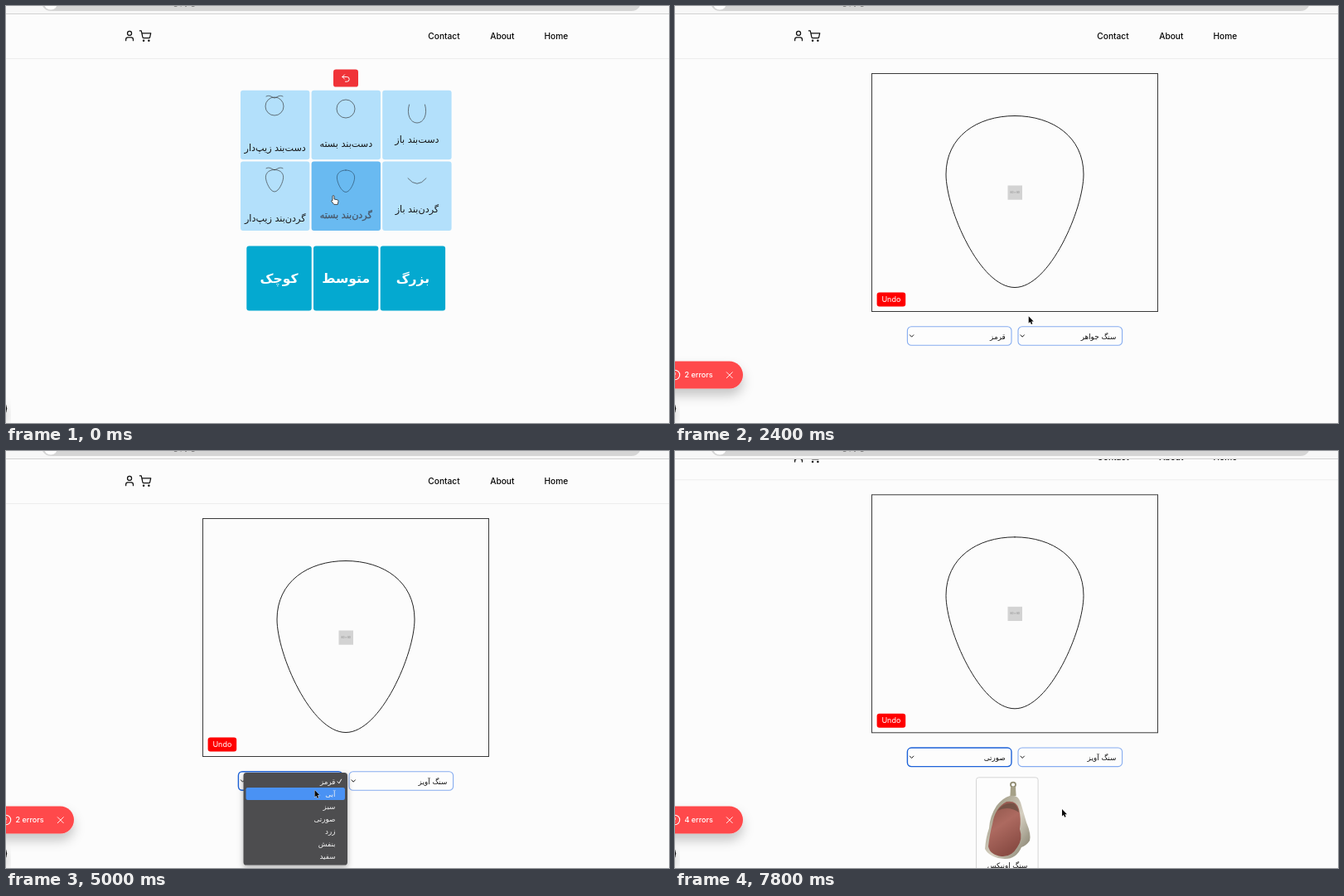
An HTML page for the animation above (8000 ms loop, 800 px wide and 503 px high).

```html
<!DOCTYPE html>
<html lang="en">
<head>
<meta charset="utf-8">
<title>Jewellery builder</title>
<style>
  html, body { margin: 0; width: 100%; height: 100%; overflow: hidden; background: #fcfcfc; }
  svg { display: block; width: 100vw; height: 100vh; }
  text { font-family: Inter, Roboto, sans-serif; }
  .fa { font-family: "DejaVu Sans", "Noto Sans", sans-serif; }
  .line { fill: none; stroke-linecap: round; stroke-linejoin: round; }
</style>
</head>
<body>
<svg id="stage" viewBox="0 0 800 503" xmlns="http://www.w3.org/2000/svg"></svg>
<script>
const LOOP = 8000, STEP = 200, SCROLL = 28.7, ROW = 15;
const PEAR = "M410 132.5C456 132.5 493 158 493 203C493 245 452 339.5 410 339.5" +
             "C368 339.5 327 245 327 203C327 158 364 132.5 410 132.5Z";
const KINDS = ["سنگ جواهر", "سنگ آویز"];
const COLOURS = ["قرمز", "آبی", "سبز", "صورتی", "زرد", "بنفش", "سفید"];

// time, x, y of the pointer tip
const PATH = [
  [0, 395, 229], [800, 398, 236], [1200, 420, 298], [1400, 423, 312], [2000, 423, 312],
  [2600, 428, 396], [2800, 428, 398], [3200, 446, 400], [3400, 452, 411], [3800, 452, 411],
  [4200, 378, 400], [4400, 373, 399], [4800, 373, 399], [5400, 371, 438], [6000, 371, 438],
  [6800, 447, 453], [7200, 470, 440], [7800, 467, 432]
];

const rect = (x, y, w, h, r, attrs) =>
  `<rect x="${x}" y="${y}" width="${w}" height="${h}" rx="${r}" ${attrs}/>`;
const text = (x, y, size, str, attrs = "") =>
  `<text x="${x}" y="${y}" font-size="${size}" ${attrs}>${str}</text>`;
const fa = (x, y, size, str, attrs = "") =>
  text(x, y, size, str, `class="fa" ${attrs}`);
const line = (d, color, width, attrs = "") =>
  `<path class="line" d="${d}" stroke="${color}" stroke-width="${width}" ${attrs}/>`;

function smallPear(cx, top) {
  return `<g transform="translate(${cx} ${top}) scale(.128) translate(-410 -132.5)">` +
    line(PEAR, "#333", 5) + `</g>`;
}
const bow = (cx, y) => line(`M${cx - 10} ${y}c4 -2 6 .6 10 2c4 -1.4 6 -4 10 -2`, "#333", .65);

function tile(col, row, label, base, art, id = "") {
  const x = 283 + col * 85.6, y = 101.8 + row * 85.7;
  return `<g id="${id}">` + rect(x, y, 83.4, 83.4, 3, 'fill="#b3e0fb"') + art +
    fa(x + 41.7, base, 11.2, label, 'text-anchor="middle" fill="#161616"') + `</g>`;
}

function sizeTile(x, label, id) {
  return rect(x, 289.5, 78.4, 78, 3, `id="${id}" fill="#04a9d0"`) +
    fa(x + 39.2, 334, 15.6, label, 'text-anchor="middle" font-weight="700" fill="#fff"');
}

function select(x, id) {
  return `<g id="${id}">` + rect(x, 386.7, 125.6, 22.6, 4.8, 'fill="#fdfdfd"') +
    line(`M${x + 3} 396.8l2.2 2.4l2.2 -2.4`, "#222", 1) +
    fa(x + 118.3, 401.5, 8.8, "", 'text-anchor="end" fill="#111"') + `</g>`;
}

function popup(x, items, id) {
  const rows = items.map((s, i) =>
    fa(x + 111, 402 + i * ROW, 8.8, s, 'text-anchor="end" fill="#f2f2f2"')).join("");
  return `<g id="${id}">` +
    rect(x, 388, 125.5, items.length * ROW + 6.5, 3.6, 'fill="#4d4d4f" filter="url(#soft)"') +
    rect(x + 3, 391, 119.5, ROW, 2.2, 'class="mark" fill="#4a92f4"') + rows +
    line(`M${x + 113.5} 398.8l1.8 2.1l2.8 -4.8`, "#fff", 1) + `</g>`;
}

const nav = `
  <path d="M0 63.5H800" stroke="#ededed"/>
  <g transform="translate(141.5 28.5) scale(.63)">
    ${line("M19 21v-2a4 4 0 0 0-4-4H9a4 4 0 0 0-4 4v2M16 7a4 4 0 1 1-8 0a4 4 0 0 1 8 0", "#111", 2)}</g>
  <g transform="translate(160.4 28.5) scale(.63)">
    ${line("M1.5 2h3l2.7 12.4a2 2 0 0 0 2 1.6h9.8a2 2 0 0 0 2-1.6L22.7 7H5.6" +
           "M10 21a1 1 0 1 1-2 0a1 1 0 0 1 2 0M20 21a1 1 0 1 1-2 0a1 1 0 0 1 2 0", "#111", 2)}</g>
  ${[[509.3, "Contact"], [584.2, "About"], [649.5, "Home"]]
    .map(([x, s]) => text(x, 40, 10.2, s, 'font-weight="500" fill="#050505"')).join("")}`;

const chooser = `<g id="chooser">
  ${rect(395, 76.6, 30, 21, 3.2, 'fill="#f03338"')}
  <g transform="translate(403.8 80.8) scale(.52)">
    ${line("M9 14L4 9l5-5M4 9h10.5a5.5 5.5 0 0 1 0 11H11", "#fff", 1.9)}</g>
  ${tile(0, 0, "دست\u200cبند زیپ\u200cدار", 174.5,
    '<circle cx="324" cy="121" r="11" fill="none" stroke="#333" stroke-width=".65"/>' + bow(324, 109))}
  ${tile(1, 0, "دست\u200cبند بسته", 170,
    '<circle cx="410" cy="124" r="11" fill="none" stroke="#333" stroke-width=".65"/>')}
  ${tile(2, 0, "دست\u200cبند باز", 164.5,
    line("M486.5 119C483 131 488 141 496 141C504 141 509 131 505.5 119", "#333", .65))}
  ${tile(0, 1, "گردن\u200cبند زیپ\u200cدار", 259.5, smallPear(324, 197.5) + bow(324, 195.8))}
  ${tile(1, 1, "گردن\u200cبند بسته", 256, smallPear(410, 198), "closed")}
  ${tile(2, 1, "گردن\u200cبند باز", 249, line("M485 207.8Q496 221 507 207.8", "#333", .65))}
  ${sizeTile(290.3, "کوچک", "small")}
  ${sizeTile(371, "متوسط", "medium")}
  ${sizeTile(451.7, "بزرگ", "large")}
</g>`;

const pendant = `<g id="pendant" transform="translate(0 ${SCROLL})">
  <ellipse cx="408" cy="402.5" rx="3" ry="2.8" fill="none" stroke="#8f8b72" stroke-width="1.8"/>
  <path d="M405 405H411L411.6 416H404.4Z" fill="#a5a087"/>
  <path fill="url(#silver)" d="M404 416Q414 414 417 424Q420 434 424 448Q430 462 428 470Q424 476 418 478
    Q412 492 398 492Q380 491 374 480Q375 466 379 455Q380 440 388 428Q396 418 404 416Z"/>
  <path fill="url(#stone)" d="M400 423Q412 421 415 432Q418 444 416 456Q420 468 413 478Q406 490 394 489
    Q380 487 378 477Q380 460 383 450Q386 430 400 423Z"/>
  <path fill="#5f4b3e" opacity=".65" d="M389 434Q397 423 409 425Q414 429 415 436Q402 427 389 434Z"/>
</g>`;

const builder = `<g id="builder">
  <rect x="237.5" y="81.5" width="345" height="287" fill="none" stroke="#3a3a3a"/>
  ${line(PEAR, "#222", 1)}
  ${rect(401.5, 216.5, 17.5, 17.2, 0, 'fill="#d3d3d3"')}
  ${text(410.2, 226.2, 3, "60 × 60", 'text-anchor="middle" font-weight="700" fill="#9a9a9a"')}
  ${rect(243.6, 345.5, 34.6, 17, 3, 'fill="#fe0000"')}
  ${text(249.4, 357, 9, "Undo", 'fill="#fff"')}
  ${select(280.4, "colour")}
  ${select(414, "kind")}
  <g id="card">
    ${rect(363.5, 422.5, 74.6, 150, 3, 'fill="#fdfdfd" stroke="#d6d6d6"')}
    ${pendant}
    <g id="caption">
      ${fa(401, 493.3, 8.8, "سنگ اونیکس", 'text-anchor="middle" fill="#111"')}
      ${fa(401, 507, 8.8, "۱۲۳", 'text-anchor="middle" fill="#111"')}
    </g>
  </g>
</g>`;

const toast = `<g id="toast">
  ${rect(-60, 428.5, 142, 33, 16.5, 'fill="#ff4a4c" filter="url(#deep)"')}
  <circle cx="0" cy="445" r="5.7" fill="none" stroke="#fff" stroke-width="1.1"/>
  <path d="M0 442v3.6M0 447.3v.8" stroke="#fff" stroke-width="1.1"/>
  ${text(11.4, 448.4, 9.1, "", 'id="count" font-weight="500" fill="#fff"')}
  ${line("M62.3 441.7l7 7M69.3 441.7l-7 7", "#fff", .9)}
</g>`;

const browser = `
  <rect width="800" height="9.5" fill="#f7f7f7"/>
  ${rect(43, -16, 723, 22, 11, 'fill="#d5d5d5"')}
  <circle cx="54" cy="-3.5" r="8" fill="#fff"/>
  ${text(202, -1.3, 9, "g  py  g", 'fill="#666"')}
  <path d="M0 9.5H800" stroke="#d2d2d2"/>`;

const pointers = `
  <path id="hand" fill="#fff" stroke="#222" stroke-width=".8" stroke-linejoin="round"
    d="M-1 .6a1 1 0 0 1 2 0V4l3.8.8q1.5.4 1.2 1.8L5.2 10.4H.8L-2.4 6.4q.1 -1.4 1.4 -.6Z"/>
  <path id="arrow" fill="#0a0a0a" stroke="#fff" stroke-width=".8" stroke-linejoin="round"
    paint-order="stroke" d="M0 0V8.4L1.9 6.7L3.2 9.7L4.7 9.1L3.4 6.2H6Z"/>`;

const stage = document.getElementById("stage");
stage.innerHTML = `
  <defs>
    <linearGradient id="silver" x1="0" y1="0" x2="1" y2="1">
      <stop offset="0" stop-color="#8c8870"/><stop offset=".55" stop-color="#d6d0c2"/>
      <stop offset="1" stop-color="#77735f"/></linearGradient>
    <linearGradient id="stone" x1="0" y1="0" x2=".4" y2="1">
      <stop offset="0" stop-color="#8a5348"/><stop offset=".5" stop-color="#ad6a60"/>
      <stop offset="1" stop-color="#8b4d45"/></linearGradient>
    <filter id="soft" x="-20%" y="-40%" width="140%" height="200%">
      <feDropShadow dx="0" dy="3" stdDeviation="3.5" flood-opacity=".3"/></filter>
    <filter id="deep" x="-20%" y="-60%" width="140%" height="260%">
      <feDropShadow dx="0" dy="8" stdDeviation="7" flood-opacity=".22"/></filter>
  </defs>
  <rect width="800" height="503" fill="#fcfcfc"/>
  <g id="page">${nav}${chooser}${builder}</g>
  ${popup(418.8, KINDS, "kinds")}
  ${popup(286.5, COLOURS, "colours")}
  <circle cx="-9.3" cy="485.5" r="10.5" fill="#111" filter="url(#deep)"/>
  ${toast}${browser}${pointers}`;

const $ = id => document.getElementById(id);
const show = (id, on) => $(id).setAttribute("display", on ? "inline" : "none");
const set = (el, attrs) => { for (const k in attrs) el.setAttribute(k, attrs[k]); };

function pointerAt(t) {
  const i = PATH.findIndex(p => p[0] >= t);
  if (i <= 0) return PATH[0].slice(1);
  const [t0, x0, y0] = PATH[i - 1], [t1, x1, y1] = PATH[i];
  const p = (t - t0) / (t1 - t0), e = p * p * (3 - 2 * p);
  return [x0 + (x1 - x0) * e, y0 + (y1 - y0) * e];
}

function setSelect(id, value, focused) {
  $(id).querySelector("text").textContent = value;
  set($(id).querySelector("rect"), {
    stroke: focused ? "#1d62d8" : "#86acf0", "stroke-width": focused ? 1.4 : 1.1
  });
}

function setPopup(id, count, open, y) {
  show(id, open);
  const i = Math.max(0, Math.min(count - 1, Math.floor((y - 391) / ROW)));
  set($(id).querySelector(".mark"), { y: 391 + i * ROW });
}

function setClosedTile(t) {
  const el = $("closed"), lit = t >= 200;
  set(el.querySelector("rect"), { fill: t < 200 ? "#69baf1" : t < 400 ? "#36a5ec" : "#0f97e6" });
  set(el.querySelector("path"), { stroke: lit ? "#0b4678" : "#2b4a63" });
  set(el.querySelector("text"), { fill: lit ? "#d5eafa" : "#48586a", "stroke": lit ? "#d5eafa" : "#48586a", "stroke-width": .3 });
}

function draw(t) {
  const [x, y] = pointerAt(t), building = t >= 2000;
  const p = Math.max(0, (t - 7200) / 600);
  const scroll = SCROLL * (1 - (1 - p) ** 2);
  set($("page"), { transform: `translate(0 ${-scroll})` });

  show("chooser", !building);
  show("builder", building);
  setClosedTile(t);
  set($("medium"), { fill: t < 1200 ? "#04a9d0" : t < 1400 ? "#0896bb" : "#0a84a7" });

  setSelect("kind", KINDS[t < 3600 ? 0 : 1], t >= 2800 && t < 4800);
  setSelect("colour", COLOURS[t < 5800 ? 0 : 3], t >= 4800);
  setPopup("kinds", KINDS.length, t >= 2800 && t < 3600, y);
  setPopup("colours", COLOURS.length, t >= 4800 && t < 5800, y);
  set($("colours"), { opacity: t < 5600 ? 1 : .045 });

  show("card", t >= 6200);
  show("pendant", t >= 7200);
  set($("caption"), { transform: `translate(0 ${t >= 7200 ? 38.7 : 0})` });

  show("toast", t >= 2400);
  $("count").textContent = (t < 5600 ? 2 : t < 7200 ? 3 : 4) + " errors";

  const pointing = t < 1400;
  show("hand", pointing);
  show("arrow", !pointing);
  set($(pointing ? "hand" : "arrow"), { transform: `translate(${x} ${y})` });
}

function tick(now) {
  draw(Math.floor(now % LOOP / STEP) * STEP);
  requestAnimationFrame(tick);
}
draw(0);
requestAnimationFrame(tick);
</script>
</body>
</html>
```
